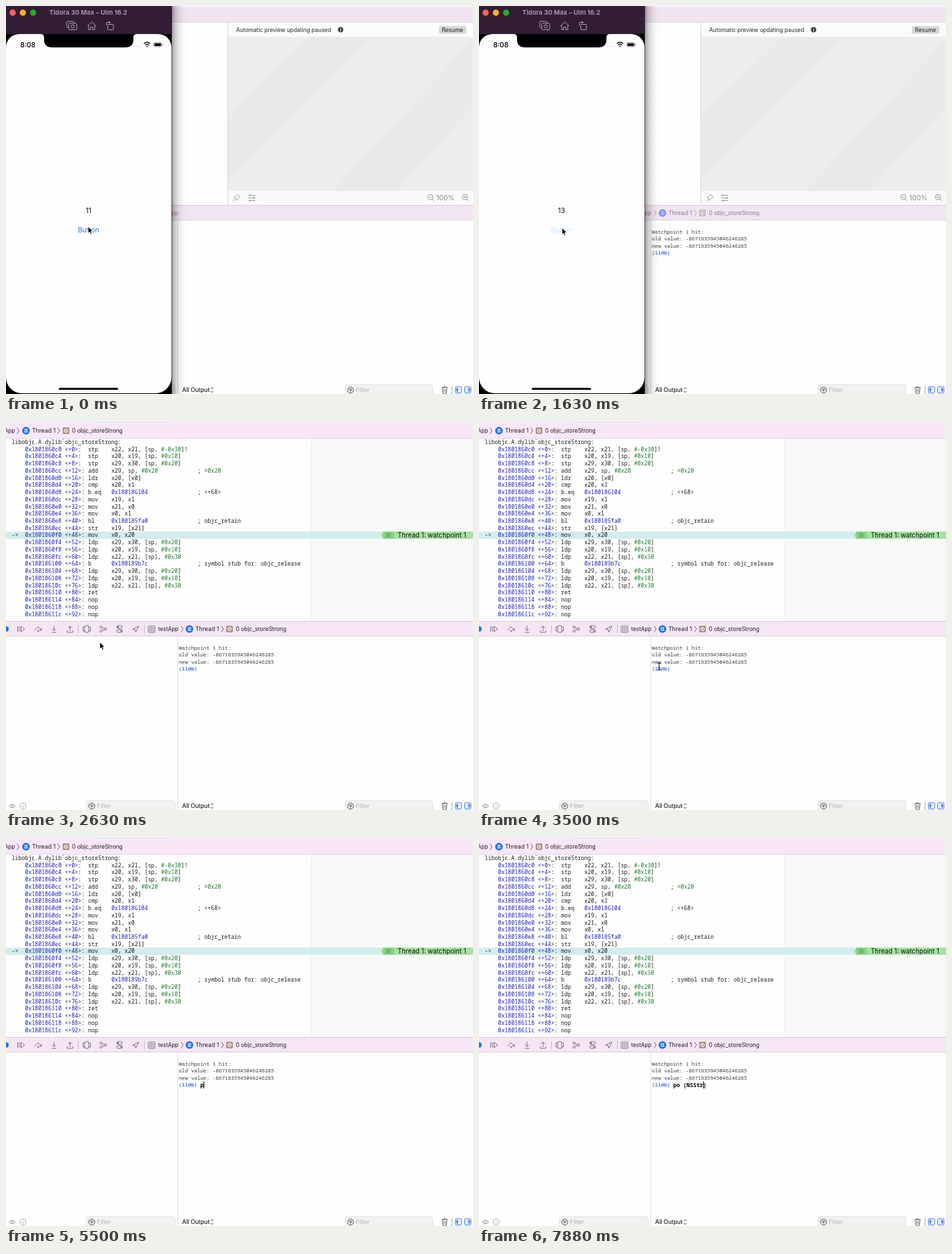
Recreate the animation shown at these times as an HTML page with a canvas. Size 700 by 581 pixels, loop 8 s.

```html
<!DOCTYPE html>
<html lang="en">
<head>
<meta charset="utf-8">
<title>Watchpoint session</title>
<style>
html, body { margin: 0; width: 100%; height: 100%; overflow: hidden; background: #fff; }
canvas { display: block; width: 700px; height: 581px; }
</style>
</head>
<body>
<canvas id="stage"></canvas>
<script>
const canvas = document.getElementById('stage');
const c = canvas.getContext('2d');
const dpr = window.devicePixelRatio || 1;
canvas.width = 700 * dpr;
canvas.height = 581 * dpr;

const UI = 'Inter, "Liberation Sans", sans-serif';
const MONO = '"Noto Sans Mono", "DejaVu Sans Mono", monospace';
const LOOP = 8000, STEP = 125;
const HIT = 1250, HIDE = 1750, ASM = 2125, FOCUS = 4125;
const COL = 4.98, ROW = 10.73;
const INK = '#1d1d1f', ICON = '#77707a', BLUE = '#1a1fc0', GREEN = '#1d7d2c';

// Drawing helpers
function rect(x, y, w, h, fill) { c.fillStyle = fill; c.fillRect(x, y, w, h); }
function round(x, y, w, h, r, fill, stroke) {
  c.beginPath();
  c.roundRect(x, y, w, h, r);
  if (fill) { c.fillStyle = fill; c.fill(); }
  if (stroke) { c.strokeStyle = stroke; c.stroke(); }
}
function disc(x, y, r, fill, stroke) {
  c.beginPath();
  c.arc(x, y, r, 0, 7);
  if (fill) { c.fillStyle = fill; c.fill(); }
  if (stroke) { c.strokeStyle = stroke; c.stroke(); }
}
function path(d, stroke, fill, x = 0, y = 0) {
  const p = new Path2D(d);
  c.save();
  c.translate(x, y);
  if (fill) { c.fillStyle = fill; c.fill(p); }
  if (stroke) { c.strokeStyle = stroke; c.stroke(p); }
  c.restore();
}
// y is the middle of the capital letters
function label(s, x, y, size, color = INK, weight = 400, align = 'left') {
  c.font = `${weight} ${size}px ${UI}`;
  c.textAlign = align;
  c.fillStyle = color;
  c.fillText(s, x, y + size * 0.36);
  c.textAlign = 'left';
}
function mono(s, x, y, color = INK, size = 8.3, weight = 400) {
  c.font = `${weight} ${size}px ${MONO}`;
  c.fillStyle = color;
  c.fillText(s, x, y + size * 0.36);
}
function tokens(s, x, y, rule, pick) {
  let at = 0;
  for (const m of s.matchAll(rule)) {
    mono(s.slice(at, m.index), x + at * COL, y);
    mono(m[0], x + m.index * COL, y, pick(m[0]));
    at = m.index + m[0].length;
  }
  mono(s.slice(at), x + at * COL, y);
}

// Editor content
const SWIFT = `  var demoObj: DemoClass?

  @State var idx: Int = 0
  init() {

    let demoClass = DemoClass()
    demoClass.someVariable = "Hello"
    demoObj = demoClass
  }

    var body: some View {
      VStack {
      Text(demoObj!.someVariable)
            .padding()
      Button(action: {
        idx += 1
      }, label: {
        Text("Button")
      })
      }.onChange(of: idx, perform: { value in
        demoObj?.someVariable = "\\(value)"
      })
    }
}`.split('\n');
const SWIFT_RULE = /"\\\(|\)"|"[^"]*"|@State|\b(?:var|let|some|in|init)\b|\b(?:DemoClass|Int|View|VStack|Text|Button)\b|\b\d\b/g;
function swiftColor(w) {
  if (w.includes('"')) return '#bb2a1e';
  if (/^\d/.test(w)) return '#1c1fcf';
  return /^[A-Z]/.test(w) ? '#33308a' : '#6b2790';
}

const OPS = `stp|x22, x21, [sp, #-0x30]!
stp|x20, x19, [sp, #0x10]
stp|x29, x30, [sp, #0x20]
add|x29, sp, #0x20|; =0x20
ldr|x20, [x0]
cmp|x20, x1
b.eq|0x180186104|; <+68>
mov|x19, x1
mov|x21, x0
mov|x0, x1
bl|0x180185fa0|; objc_retain
str|x19, [x21]
mov|x0, x20
ldp|x29, x30, [sp, #0x20]
ldp|x20, x19, [sp, #0x10]
ldp|x22, x21, [sp], #0x30
b|0x180189b7c|; symbol stub for: objc_release
ldp|x29, x30, [sp, #0x20]
ldp|x20, x19, [sp, #0x10]
ldp|x22, x21, [sp], #0x30
ret
nop
nop
nop`.split('\n').map((row, i) => {
  const [op, args = '', note = ''] = row.split('|');
  const head = `0x${(0x1801860c0 + 4 * i).toString(16)} <+${4 * i}>:`;
  return (head.padEnd(19) + op.padEnd(7) + args).padEnd(52) + note;
});
const ASM_RULE = /#-?0x\w+|=0x\w+|0x\w{6,}|\+\d+(?=>:)/g;
const asmColor = w => /^[#=]/.test(w) ? GREEN : BLUE;

// Small interface parts
const chevron = (x, y) => path('M-1.6-4.5L1.6 0L-1.6 4.5', '#6d6570', null, x, y);
function threadIcon(x, y, fill) {
  disc(x, y, 5.8, fill);
  path('M-1.2-3V3M1.2-3V3M-2.6-1.6H2.6M-2.6 1.6H2.6', '#dcecff', null, x, y);
}
function frameIcon(x, y) {
  round(x - 5, y - 5, 10, 10, 1.5, '#ac9288');
  disc(x, y, 2.6, null, '#fff');
  disc(x, y, 0.9, '#fff');
}
function filter(x, w) {
  round(x, 567, w, 17, 4, '#f3f2f3', '#dfdddf');
  disc(x + 8, 575, 4.5, null, '#4b4b4d');
  path('M-2.5-1.3H2.5M-1.6 .4H1.6M-.7 2H.7', '#4b4b4d', null, x + 8, 575);
  label('Filter', x + 16, 575, 8.7, '#b0aeb0');
}
function lens(x, y, plus, color) {
  disc(x, y - 1, 4, null, color);
  path('M3 2L6 5M-2-1H2' + (plus ? 'M0-3V1' : ''), color, null, x, y);
}

function topBar(t, active) {
  rect(0, 0, 700, 25, active ? '#f9e7f8' : '#f1e3f0');
  rect(0, 0, 700, 1.5, '#f8f5f8');
  if (active) rect(t < ASM ? 150 : 135, 0, t < ASM ? 92 : 111, 1, '#cfe2f7');
  rect(0, 24, 700, 1, '#e2d5e1');
  label('App', -2.5, 13, 8.4);
  chevron(18, 13);
  if (t < ASM) {
    path('M24 9.5Q24 8 25.5 8H28.5L30 9.5H34.5Q36 9.5 36 11V16.5Q36 18 34.5 18H25.5Q24 18 24 16.5Z', null, '#f68b1f');
    path('M26.5 12H33.5M26.5 15H33.5', '#ffd9ae');
    label('testApp', 39, 13, 8.4);
    chevron(76, 13);
    disc(87, 13, 4, '#f0643c');
    label('ContentView.swift', 95.5, 13, 8.3);
    chevron(173, 13);
    round(179, 8, 10, 10, 2, '#2a86ec');
    label('P', 184, 13, 7, '#fff', 600, 'center');
    label('body', 193, 13, 8.5);
  } else {
    threadIcon(30, 13, '#2377e4');
    label('Thread 1', 39, 13, 8.7);
    chevron(79, 13);
    frameIcon(90, 13);
    label('0 objc_storeStrong', 99, 13, 8.5);
  }
}

function preview(active) {
  rect(333, 25, 367, 21, '#fbfbfb');
  rect(333, 46, 367, 231, '#ededed');
  path('M455 46H545L333 262V165ZM700 50V150L585 277H490Z', null, '#e9e9e9');
  rect(333, 277, 367, 21, '#fbfafb');
  rect(332, 25, 1, 273, '#d9d6d9');
  label('Automatic preview updating paused', 345, 35.5, 8.4, '#28282a');
  disc(501.5, 35.5, 4, '#454547');
  label('i', 501.5, 35.5, 6, '#fff', 700, 'center');
  round(649, 30, 41, 11.5, 2.5, '#d9d8d9');
  label('Resume', 669.3, 35.7, 8.4, INK, 400, 'center');
  const gray = active ? '#6d6d70' : '#9b9a9d';
  path('M1-5L5-1L3.5-.5L1 2L.5 4L-4-.5L-2-1L.5-3.5ZM-2 2L-5 5', gray, null, 346, 287);
  const soft = active ? '#b3b2b5' : gray;
  path('M-5-4H5M-5 0H5M-5 4H5', soft, null, 368.5, 287.5);
  disc(365.5, 283.5, 1.2, soft); disc(371.5, 287.5, 1.2, soft); disc(365.5, 291.5, 1.2, soft);
  lens(636, 287, false, gray);
  label('100%', 645, 287.5, 10.4, active ? '#4a4a4d' : '#89888b');
  lens(688, 287, true, gray);
}

function swiftPane(active) {
  rect(0, 25, 333, 273, '#fefefe');
  rect(182.8, 245.5, 26, 10.5, '#a8cdfb');
  SWIFT.forEach((s, i) => tokens(s, 8.5, 36 + i * ROW, SWIFT_RULE, swiftColor));
  path('M0 106.5H3L6 111L3 115.5H0Z', null, '#2270e0');
  preview(active);
}

function asmPane() {
  rect(0, 25, 700, 273, '#fefefe');
  rect(457, 25, 243, 273, '#f8f8f8');
  rect(457, 25, 1, 273, '#eeeeee');
  rect(0, 164, 563, 11, '#d5ecec');
  path('M562 169.5L565 164H700V175H565Z', null, '#a5e2a1');
  rect(565, 164, 17, 11, '#88d584');
  path('M569.5 167.3H576.5M569.5 169.5H576.5M569.5 171.7H576.5', '#4c9a4b');
  label('Thread 1: watchpoint 1', 587, 169.7, 9.75, '#111');
  mono('libobjc.A.dylib`objc_storeStrong:', 8.5, 30);
  mono('->', 8.5, 30 + 13 * ROW);
  OPS.forEach((s, i) => tokens(s, 8.5 + 4 * COL, 30 + (i + 1) * ROW, ASM_RULE, asmColor));
}

function debugBar(t, active) {
  rect(0, 298, 700, 23, active ? '#f6e6f5' : '#f2e4f1');
  rect(0, 298, 700, 1, '#d8ccd7');
  rect(0, 320, 700, 1, '#d8ccd7');
  c.save();
  if (!active) c.globalAlpha = 0.5;
  disc(0, 310, 4, '#1c6fe6');
  path('M17.5 306V314M20 306V314M22.5 306L28 310L22.5 314Z', ICON);
  path('M43 312L48 306.5L53 312M53 308.5V312H49.5', ICON);
  disc(48, 313, 1.2, ICON);
  path('M72 305V312M69 309.5L72 312.5L75 309.5M68.5 315H75.5', ICON);
  path('M96 313V306M93 308.5L96 305.5L99 308.5M92 312V315H100V312', ICON);
  rect(108, 304, 1, 12, '#c9bdc8');
  round(118, 305, 6, 10, 1, null, ICON);
  path('M118 307H115.5V313H118M124 307H126.5V313H124', ICON);
  disc(142.5, 307, 1.7, null, ICON); disc(142.5, 313, 1.7, null, ICON); disc(149, 310, 1.7, null, ICON);
  path('M144 308L147.5 309.5M144 312.5L147.5 310.7', ICON);
  round(166, 305, 8.5, 4, 2, null, ICON);
  round(166, 311, 8.5, 4, 2, null, ICON);
  disc(168, 307, 1.2, ICON); disc(172.5, 313, 1.2, ICON);
  path('M189.5 310.5L199 305.5L194.5 315L193.8 311Z', ICON);
  rect(207, 304, 1, 12, '#c9bdc8');
  round(213, 305, 10.5, 10.5, 1.5, '#eee7ee', '#a39ca4');
  path('M215.5 305V315.5M218.2 305V315.5M221 305V315.5M213 307.6H223.5M213 310.3H223.5M213 313H223.5', '#a39ca4');
  label('testApp', 228, 310, 8.4);
  if (t >= HIT) {
    chevron(264, 310);
    threadIcon(275, 310, active ? '#2377e4' : '#2444ee');
    label('Thread 1', 284, 310, 8.7);
    chevron(324.5, 310);
    frameIcon(335, 310);
    label('0 objc_storeStrong', 344.5, 310, 8.5);
  }
  c.restore();
}

// Prompt typing: [time, text, caret column]
const KEYS = [
  [FOCUS, '', 0], [5500, 'p', 1], [5625, 'po', 2], [5750, 'po ', 3],
  [6125, 'po (', 4], [6375, 'po ()', 5], [6875, 'po ()', 4],
  [7125, 'po (N)', 5], [7250, 'po (NS)', 6], [7375, 'po (NSS)', 7],
  [7500, 'po (NSSt)', 8], [7750, 'po (NSStr)', 9]
];

function consolePane(t) {
  rect(0, 321, 700, 260, '#fefefe');
  rect(257, 321, 1, 260, '#dedcde');
  if (t >= HIT) {
    const v = 'value: -8671835945046246285';
    ['Watchpoint 1 hit:', 'old ' + v, 'new ' + v].forEach((s, i) => mono(s, 259, 338 + i * 10.6, '#3a3a3c', 7.68));
    mono('(lldb)', 259, 369.7, '#3e70f2', 7.68, 700);
  }
  const key = KEYS.filter(k => k[0] <= t).pop();
  if (key) {
    mono(key[1], 291.2, 369.7, '#000', 8.3, 700);
    if ((t - key[0]) % 1000 < 560) rect(291.2 + key[2] * COL, 364.5, 1, 10.5, '#000');
  }
  path('M4.5 575Q9.5 569.5 14.5 575Q9.5 580.5 4.5 575Z', '#aaa8aa');
  disc(9.5, 575, 1.8, null, '#aaa8aa');
  disc(25.5, 575, 4.5, null, '#aaa8aa');
  label('i', 25.5, 575, 7, '#aaa8aa', 500, 'center');
  filter(120.5, 133);
  label('All Output', 264, 575, 8.7, INK, 500);
  path('M307 573.5L309 571.3L311 573.5M307 576.5L309 578.7L311 576.5', '#444');
  filter(508.5, 131);
  path('M653 571.5H662M656 571.5V570H659V571.5M654 571.5L654.7 580H660.3L661 571.5M656.3 573.5V578M658.7 573.5V578', '#6a686b');
  rect(668, 569, 1, 12, '#aaa8aa');
  [673.5, 687.5].forEach((x, i) => {
    round(x, 570, 9.5, 9.5, 1.5, '#e8f0ff', '#4c7df0');
    rect(x + (i ? 5.5 : 1.5), 572, 2.5, 5.5, '#4c7df0');
  });
}

function phone(t) {
  const fade = c.createLinearGradient(248, 0, 272, 0);
  [0.5, 0.23, 0.09, 0.025, 0].forEach((a, i) => fade.addColorStop(i / 4, `rgba(60,50,60,${a})`));
  rect(248, 0, 24, 581, fade);
  rect(0, 0, 248.5, 581, '#000');
  rect(0, 0, 248.5, 42, '#321d35');
  ['#fc5f57', '#fdae2c', '#2aa834'].forEach((f, i) => disc(10 + i * 15.3, 10, 4.7, f));
  label('Tidora 30 Max – Ulm 16.2', 123.3, 10, 9.6, '#a396a6', 700, 'center');
  const ic = '#b3a3b6';
  round(91, 23, 11, 9, 1.5, null, ic);
  round(94, 26, 12, 9.5, 1.5, '#321d35', ic);
  disc(100, 30.7, 2.4, null, ic);
  path('M122 30L128.5 24L135 30M124 29V35.5H127V31.5H130V35.5H133V29', ic);
  round(152.5, 27.5, 8.5, 8, 1, null, ic);
  path('M150.5 29V26Q150.5 24.5 152 24.5H156M154 22.5L156.3 24.5L154 26.5', ic);

  round(0, 42, 248, 538, [20, 20, 24, 24], '#fefefe');
  path('M52 42Q57 42 57 47V50Q57 62 69 62H179Q191 62 191 50V47Q191 42 196 42Z', null, '#000');
  label('8:08', 21.5, 58, 10, '#111', 600);
  for (let i = 0; i < 4; i++) disc(193.5 + i * 2.7, 60.5, 0.6, '#aaa');
  c.lineWidth = 1.4;
  path('M206.8 56.5Q211.5 52.2 216.2 56.5M208.6 58.5Q211.5 56 214.4 58.5', '#111');
  c.lineWidth = 1;
  disc(211.5, 60.5, 1.1, '#111');
  round(221.5, 54.8, 12, 6.2, 1.8, null, '#999');
  round(222.5, 55.8, 10, 4.2, 1, '#111');
  rect(234.6, 56.6, 1, 2.6, '#999');

  const count = t < 500 ? '11' : t < 1125 ? '12' : '13';
  label(count, 123.7, 306.7, 10.5, '#111', 400, 'center');
  const pressed = (t >= 375 && t < 500) || t >= 1000;
  c.globalAlpha = pressed ? 0.2 : 1;
  label('Button', 123.7, 335, 10.3, '#147ce5', 400, 'center');
  c.globalAlpha = 1;
  round(79, 571.8, 89, 3, 1.5, '#000');
}

const MOVES = [
  [0, 123, 330], [1500, 124.3, 331.8], [2250, 124.3, 331.8], [2625, 140.5, 329.5],
  [3000, 175, 338], [3500, 270, 366], [3875, 312.5, 377]
];
function pointer(t) {
  if (t >= 5500) return;
  let x = 312.5, y = 377;
  const i = MOVES.findIndex(m => m[0] > t);
  if (i > 0) {
    const a = MOVES[i - 1], b = MOVES[i];
    const p = (t - a[0]) / (b[0] - a[0]);
    x = a[1] + (b[1] - a[1]) * p;
    y = a[2] + (b[2] - a[2]) * p;
  }
  if (x > 258) {
    path('M-2.8-5.5Q0-5.5 0-3.5Q0-5.5 2.8-5.5M0-3.5V3.5M-2.8 5.5Q0 5.5 0 3.5Q0 5.5 2.8 5.5M-1.5 1.5H1.5', '#111', null, x, y);
  } else {
    path('M0 0V10.6L2.4 8.4L4.1 12.2L6 11.3L4.3 7.7H7.6Z', '#fff', '#000', x, y);
  }
}

function draw(t) {
  const active = t >= HIDE;
  c.setTransform(dpr, 0, 0, dpr, 0, 0);
  c.lineWidth = 1;
  rect(0, 0, 700, 581, '#fff');
  topBar(t, active);
  if (t < ASM) swiftPane(active); else asmPane();
  debugBar(t, active);
  consolePane(t);
  if (!active) {
    // The editor behind the phone shows only its blank margin.
    rect(248, 25, 84, 273, '#fefefe');
    phone(t);
  }
  pointer(t);
}

const start = performance.now();
function tick() {
  const t = (performance.now() - start) % LOOP;
  draw(Math.floor(t / STEP) * STEP);
  requestAnimationFrame(tick);
}
draw(0);
requestAnimationFrame(tick);
</script>
</body>
</html>
```
